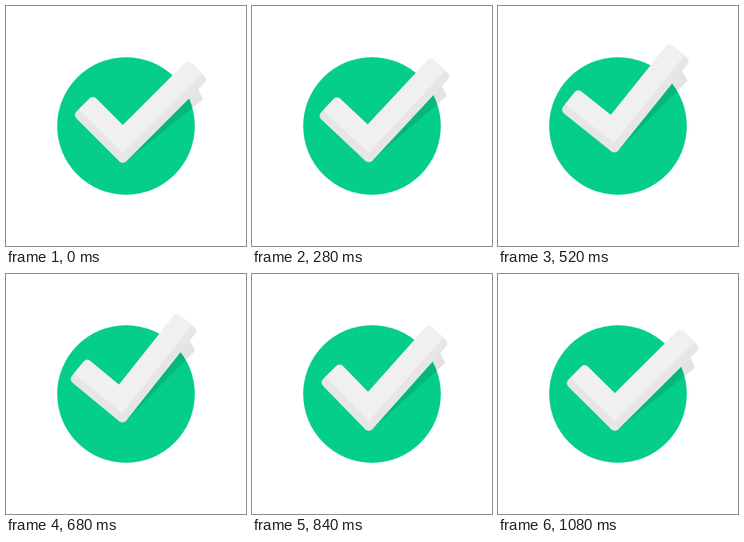
An HTML page without scripts for the animation above (1.28 s loop, 300 by 300 pixels).

```html
<!DOCTYPE html>
<html lang="en">
<head>
<meta charset="utf-8">
<title>Check mark</title>
<style>
html, body { margin: 0; width: 100%; height: 100%; overflow: hidden; background: #fff; }
svg { display: block; width: 100vw; height: 100vh; }

.lift, .long, .short { animation: 1280ms linear infinite; }
.lift { animation-name: lift; }
.long { animation-name: long; }
.short { animation-name: short; }
.shade { fill: #e6e6e6; }
.light { fill: #f0f0f0; }

/* hop of the corner where both arms meet */
@keyframes lift {
  0%, 19.5% { transform: translate(146px, 190px); animation-timing-function: ease-in; }
  28.13% { transform: translate(146px, 184px); animation-timing-function: ease-out; }
  40.63% { transform: translate(145.5px, 177px); }
  46.88% { transform: translate(145.5px, 176.8px); animation-timing-function: ease-in; }
  53.13% { transform: translate(145.5px, 179.5px); }
  63%, 100% { transform: translate(146px, 190px); }
}
@keyframes long {
  0% { transform: rotate(-45deg); animation-timing-function: ease-in-out; }
  15.63% { transform: rotate(-42.9deg); animation-timing-function: ease-in-out; }
  28.13% { transform: rotate(-51deg); }
  40.63% { transform: rotate(-51.2deg); }
  53.13% { transform: rotate(-51.5deg); animation-timing-function: ease-in; }
  65.63% { transform: rotate(-48.3deg); animation-timing-function: ease-out; }
  84.38%, 100% { transform: rotate(-44.8deg); }
}
@keyframes short {
  0% { transform: rotate(-45deg); animation-timing-function: ease-in-out; }
  15.63% { transform: rotate(-41.8deg); animation-timing-function: ease-in-out; }
  28.13% { transform: rotate(-44.5deg); animation-timing-function: ease-in-out; }
  40.63% { transform: rotate(-38.6deg); }
  53.13% { transform: rotate(-39.6deg); animation-timing-function: ease-in-out; }
  65.63% { transform: rotate(-45.8deg); animation-timing-function: ease-out; }
  84.38%, 100% { transform: rotate(-44.8deg); }
}
</style>
</head>
<body>
<svg viewBox="0 0 300 300">
  <circle cx="150" cy="150" r="86" fill="#05cd8c"/>
  <g class="lift">
    <path class="long" d="M0 5L3 6L122.5 19L128 5V0H0Z" fill-opacity=".11"/>

    <g class="shade">
      <circle r="6"/>
      <path class="long" d="M0 6H138.5a6 6 0 0 0 6-6V-23a6 6 0 0 0-6-6H20L0 0Z"/>
      <g transform="scale(-1 1)">
        <path class="short" d="M0 6H76a6 6 0 0 0 6-6V-23a6 6 0 0 0-6-6H20L0 0Z"/>
      </g>
    </g>

    <g class="light">
      <path class="long" d="M4-4H144.5V-23a6 6 0 0 0-6-6H20Z"/>
      <g transform="scale(-1 1)">
        <path class="short" d="M4-4H82V-23a6 6 0 0 0-6-6H20Z"/>
      </g>
    </g>
  </g>
</svg>
</body>
</html>
```
